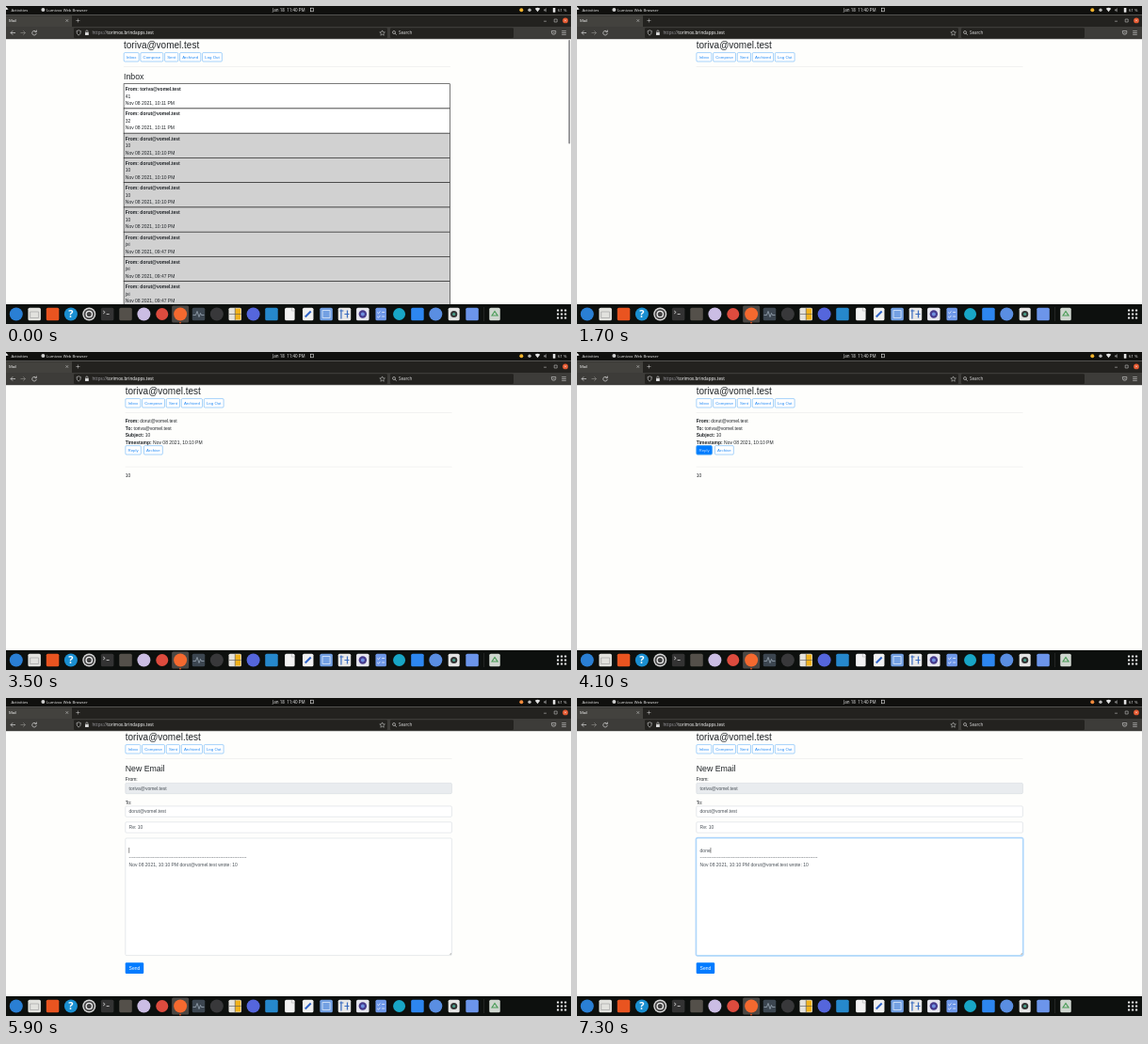
Recreate the animation shown at these times as an HTML page. Size 600 px wide and 338 px high, loop 8 s.

```html
<!DOCTYPE html>
<html lang="en">
<head>
<meta charset="utf-8">
<title>Mail</title>
<style>
  html, body { margin: 0; width: 100%; height: 100%; overflow: hidden; background: #fefefc; }
  svg { display: block; width: 100vw; height: 100vh; font-family: "Liberation Sans", Arial, sans-serif; }
  .ui { font-family: "Noto Sans", sans-serif; }
  text { white-space: pre; }
</style>
</head>
<body>
<svg id="stage" viewBox="0 0 600 338" preserveAspectRatio="none"></svg>
<script>
const LOOP = 8000;
const OPEN = 1700, LOADED = 2100, HOVER = 4000, COMPOSE = 4800, FOCUS = 5900;
const CARET_OFF = 6600;
const TYPED = [[7000, "do"], [7100, "don"], [7300, "done"]];

const ME = "toriva@vomel.test", FRIEND = "dorut@vomel.test";
const BLUE = "#007bff", INK = "#212529", FIELD_INK = "#495057";

const rect = (x, y, w, h, fill, extra = "") =>
  `<rect x="${x}" y="${y}" width="${w}" height="${h}" fill="${fill}" ${extra}/>`;
const circle = (x, y, r, fill, extra = "") =>
  `<circle cx="${x}" cy="${y}" r="${r}" fill="${fill}" ${extra}/>`;
const text = (x, y, size, content, fill = INK, extra = "") =>
  `<text x="${x}" y="${y}" font-size="${size}" fill="${fill}" ${extra}>${content}</text>`;
const line = (d, stroke, width = 0.7, extra = "") =>
  `<path d="${d}" fill="none" stroke="${stroke}" stroke-width="${width}" ${extra}/>`;
const group = (id, content) => `<g id="${id}">${content}</g>`;
const bold = s => `<tspan font-weight="bold">${s}</tspan>`;

const button = (x, y, w, label) =>
  rect(x + 0.2, y, w - 0.4, 9.4, "#fff", 'rx="1.1" stroke="#3c9cf5" stroke-width=".45"') +
  text(x + w / 2, y + 6.2, 4.375, label, "#2089f5", 'text-anchor="middle"');
const rule = y => rect(125, y, 346.8, 0.5, "#e4e4e4");
const field = (y, h, fill = "#fff", extra = "") =>
  rect(125.1, y, 346.6, h, fill, `rx="1.2" stroke="#ced4da" stroke-width=".5" ${extra}`);

function header() {
  return text(125, 44.8, 10, ME) +
    [["Inbox", 125, 16.3], ["Compose", 142.7, 24.3], ["Sent", 168.4, 14.6],
     ["Archived", 184.4, 22.6], ["Log Out", 208.4, 21.2]]
      .map(([label, x, w]) => button(x, 49.6, w, label)).join("") +
    rule(64.3);
}

function inbox() {
  const rows = [[ME, "41", "10:11"], [FRIEND, "32", "10:11"]]
    .concat(Array(4).fill([FRIEND, "10", "10:10"]), Array(3).fill([FRIEND, "jxi", "09:47"]));
  return text(125, 78, 8.75, "Inbox") + rows.map(([from, subject, time], i) => {
    const y = 82.7 + i * 26.25;
    return rect(125.1, y, 346.5, 26.25, i < 2 ? "#fff" : "#d1d1d1", 'stroke="#222" stroke-width=".6"') +
      text(126.8, y + 7.4, 5, bold("From: " + from)) +
      text(126.8, y + 14.9, 5, subject) +
      text(126.8, y + 22.4, 5, `Nov 08 2021, ${time} PM`);
  }).join("") + rect(597.3, 36, 1.8, 110.5, "#8d8d90", 'rx=".9"');
}

function message() {
  const lines = [["From:", FRIEND], ["To:", ME], ["Subject:", "10"], ["Timestamp:", "Nov 08 2021, 10:10 PM"]];
  return lines.map(([k, v], i) => text(125, 75 + i * 7.55, 5, `${bold(k)} ${v}`)).join("") +
    group("reply", button(125, 99.6, 16.8, "Reply")) + button(144.6, 99.6, 20.2, "Archive") +
    rule(121.8) + text(125, 132.8, 5, "10");
}

function compose() {
  const value = (y, s, extra) => text(128.9, y, 5, s, FIELD_INK, extra);
  return text(125, 78, 8.75, "New Email") +
    text(125, 88.2, 5, "From:") + field(90.4, 11.3, "#e9ecef") + value(98, ME) +
    text(125, 112.5, 5, "To:") + field(114.9, 11.4) + value(122.4, FRIEND) +
    field(131.8, 11.4) + value(139.1, "Re: 10") +
    rect(124.4, 148.3, 348, 126, "none", 'id="ring" rx="1.8" stroke="#80bdff" stroke-width="1"') +
    field(149, 124.6, "#fff", 'id="body"') +
    value(163.8, "", 'id="typed"') + rect(128.9, 159, 0.5, 5.8, "#222", 'id="caret"') +
    value(171.2, "-".repeat(75)) +
    value(178.8, `Nov 08 2021, 10:10 PM ${FRIEND} wrote: 10`) +
    line("M469.4 272.8l1.8-1.8M470.5 272.8l.8-.8", "#666", 0.4) +
    rect(125, 281.3, 19.5, 11.7, BLUE, 'rx="1.2"') +
    text(134.75, 289, 5, "Send", "#fff", 'text-anchor="middle"');
}

function topBar() {
  const pale = "#e4e4e4";
  return rect(0, 0, 600, 9.5, "#10100e") +
    group("pointer", '<path d="M0 1l2.6 2.6-2.6.4z" fill="#fff"/>') +
    text(5.5, 5.8, 4.3, "Activities", pale) + circle(39.4, 4, 2, "#cfcfcf") +
    text(43, 5.8, 4.2, "Lumivox Web Browser", pale) +
    text(283, 5.8, 4.5, "Jan 18  11:40 PM", pale) +
    rect(323.4, 2.2, 3.2, 3.6, "none", `stroke="${pale}" stroke-width=".6"`) +
    circle(547.3, 4.2, 2, "#f0b22c", 'id="tray"') + circle(556, 4.2, 1.7, "#bbb") +
    `<path d="M561.8 2.8q2.7-2 5.4 0l-2.7 3.4z" fill="${pale}"/>` +
    '<path d="M571 3.4h1.2l1.6-1.4v4.6l-1.6-1.4h-1.2z" fill="#777"/>' +
    rect(580.8, 2, 2.6, 4.8, pale, 'rx=".5"') + text(586, 5.8, 4.2, "61 %", pale);
}

function browserBar() {
  const pale = "#d8d8d8", strip = "#23221f", bar = "#3d3c39";
  return rect(0, 9.5, 600, 12.5, strip) + rect(0, 10.3, 70, 11.7, "#43423e") +
    rect(0, 22, 600, 13.2, bar) +
    text(3, 17.2, 4.2, "Mail", "#f2f2f2") +
    line("M63.5 14.2l2.6 2.6m0-2.6l-2.6 2.6M74.4 15.5h4M76.4 13.5v4", pale, 0.5) +
    line("M571 16.2h3M582.2 14h3v3h-3z", pale, 0.5) +
    circle(594, 15.4, 2.9, "#e4572e") + line("M593 14.4l2 2m0-2l-2 2", "#fff", 0.5) +
    line("M10 28.5h-5m2.2-2.2l-2.2 2.2 2.2 2.2", pale) +
    line("M15.5 28.5h5m-2.2-2.2l2.2 2.2-2.2 2.2", "#8a8985") +
    line("M31.8 27.2a2.3 2.3 0 1 0 .5 1.8M32.4 25.6v2h-2", pale) +
    rect(72, 23.2, 333, 10.7, strip, 'rx="1.2"') + rect(408, 23.2, 131, 10.7, strip, 'rx="1.2"') +
    line("M75 26.6l2.2-.8 2.2.8q0 3.4-2.2 4.6-2.2-1.2-2.2-4.6z", pale, 0.6) +
    rect(84, 28, 3.8, 3, pale, 'rx=".5"') + line("M84.8 28v-1a1.1 1.1 0 0 1 2.2 0v1", pale, 0.6) +
    text(91.5, 30.2, 4.6, 'https://<tspan fill="#f4f4f4">torimox.brindapps.test</tspan>', "#98979d") +
    line("M399.6 25.9l.8 1.8 2 .2-1.5 1.3.4 2-1.7-1-1.7 1 .4-2-1.5-1.3 2-.2z", pale, 0.5) +
    circle(412, 28, 1.5, "none", `stroke="${pale}" stroke-width=".6"`) + line("M413 29.1l1.6 1.6", pale) +
    text(417, 30.2, 4.5, "Search", pale) +
    line("M579.4 26.5h4.4v1.6a2.2 2.2 0 0 1-4.4 0zM580.6 28l1 1 1-1", pale, 0.6) +
    line("M590.2 26.6h4.6m-4.6 1.9h4.6m-4.6 1.9h4.6", pale, 0.6);
}

function dock() {
  const Y = 327.5;
  const disc = (fill, r = 7) => x => circle(x, Y, r, fill);
  const tile = (fill, w = 13.5, h = 13.5) => x => rect(x - w / 2, Y - h / 2, w, h, fill, 'rx="1.6"');
  const both = (...parts) => x => parts.map(part => part(x)).join("");
  const glyph = (s, size, fill) => x =>
    text(x, Y + size * 0.36, size, s, fill, 'text-anchor="middle" font-weight="bold"');
  const stroke = (d, color, width = 1) => x => line(d, color, width, `transform="translate(${x} ${Y})"`);

  const icons = [
    disc("#2a7fd4"),
    both(tile("#e2e2de"), stroke("M-4.5-2.5h9v6.5h-9z", "#aaa", 0.8)),
    tile("#e95420"),
    both(disc("#1a8fd1"), glyph("?", 11, "#fff")),
    both(disc("#d6d6d6"), disc("#444", 5.6), stroke("M-3.2 0a3.2 3.2 0 1 0 6.4 0 3.2 3.2 0 1 0-6.4 0", "#eee", 1.3)),
    both(tile("#333"), stroke("M-4.5-3.5l2 1.5-2 1.5M-1 0h3", "#ddd", 0.8)),
    tile("#54504a"),
    disc("#cbbde4"),
    disc("#dd4b3e", 6.5),
    both(tile("#4a4744", 18, 18), disc("#f4692f")),
    both(tile("#3c4650"), stroke("M-6 1h3l1.5-4 2 6 1.5-4 1 2h3", "#9aa7b4", 0.8)),
    disc("#38383a"),
    both(tile("#e4e2dc"), x => rect(x, Y - 6, 6, 12, "#f2b21b"), stroke("M0-6.5v13M-6.5 0h13", "#555", 0.6)),
    disc("#5566dc"),
    tile("#2688cc"),
    both(tile("#f2f2f2", 10.5), stroke("M2-6.5v3h3", "#bbb", 0.7)),
    both(tile("#f0f0f0", 11.5), stroke("M-3 3l6-6", "#2d62c8", 2)),
    both(tile("#73a0e2"), stroke("M-4-4h8v8h-8z", "#dce9fb", 0.8)),
    both(tile("#e8e8e8"), stroke("M-3.5-5v10M-5-3.5h4M0 0h5M3-4v8", "#3a6cc0", 1.2)),
    both(tile("#e6e6ee"), disc("#463a8c", 4.2), disc("#6f8fe0", 2)),
    both(tile("#6f98e8", 11.5), stroke("M-4-2l1.3 1.3L-.8-3M1-2h3M-4 2.5l1.3 1.3L-.8 1.5M1 2.5h3", "#e8f0ff", 0.8)),
    disc("#18a6c6", 6.5),
    tile("#2d86f0"),
    disc("#5a8ee2"),
    both(tile("#e4e4e4", 12), disc("#333", 3.6), disc("#48a08c", 1.6)),
    tile("#6c95ea")
  ];
  const trash = both(tile("#cfd6cf", 11.5), stroke("M-3 1.5L0-3 3 1.5z", "#4b9c58", 1.2));
  const dots = Array.from({ length: 9 }, (_, i) =>
    rect(585 + (i % 3) * 4, 322.4 + Math.floor(i / 3) * 4, 2.2, 2.2, "#f0f0f0", 'rx=".5"')).join("");
  return rect(0, 317, 600, 21, "#0d100e") +
    icons.map((icon, i) => icon(10.8 + i * 19.37)).join("") +
    circle(185, 336.6, 0.9, "#e95420") +
    rect(507.4, 320, 0.5, 15, "#3a3a3a") + trash(519) + dots;
}

const stage = document.getElementById("stage");
stage.innerHTML = rect(0, 35, 600, 283, "#fefefc") +
  group("page", header() + group("inbox", inbox()) + group("message", message()) + group("compose", compose())) +
  `<g class="ui">${topBar()}${browserBar()}${dock()}</g>`;

const get = id => document.getElementById(id);
const show = (id, on) => get(id).setAttribute("display", on ? "inline" : "none");
const ramp = (t, start) => Math.min(1, Math.max(0, (t - start) / 150));
const mix = (a, b, k) => `rgb(${a.map((v, i) => Math.round(v + (b[i] - v) * k))})`;

function draw(t) {
  t = Math.floor(t / 100) * 100;
  get("page").setAttribute("transform", `translate(${t < OPEN ? 0 : 1.7} 0)`);
  show("inbox", t < OPEN);
  show("message", t >= LOADED && t < COMPOSE);
  show("compose", t >= COMPOSE);
  show("pointer", t < COMPOSE);
  get("tray").setAttribute("fill", t < COMPOSE ? "#f0b22c" : "#f08a3c");

  const hover = ramp(t, HOVER - 50);
  const [box, label] = get("reply").children;
  box.setAttribute("fill", mix([255, 255, 255], [0, 123, 255], hover));
  box.setAttribute("stroke-width", 0.45 + 0.55 * hover);
  label.setAttribute("fill", mix([32, 137, 245], [190, 220, 255], hover));

  const focus = ramp(t, FOCUS);
  get("body").setAttribute("stroke", mix([206, 212, 218], [100, 180, 245], focus));
  get("ring").setAttribute("opacity", focus * 0.6);

  const typed = TYPED.reduce((now, [at, word]) => t >= at ? word : now, "");
  get("typed").textContent = typed;
  show("caret", t >= FOCUS && (t < CARET_OFF || typed));
  get("caret").setAttribute("x", 128.9 + typed.length * 2.78);
}

const start = performance.now();
(function tick() {
  draw((performance.now() - start) % LOOP);
  requestAnimationFrame(tick);
})();
</script>
</body>
</html>
```
